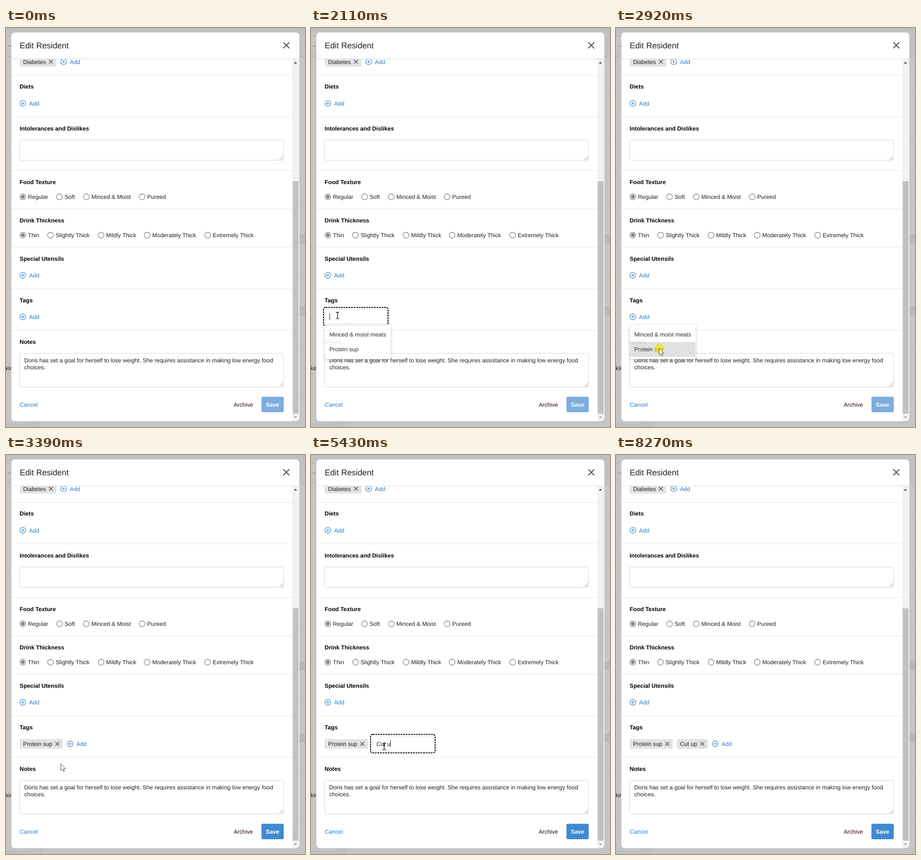
Recreate the animation shown at these times as an HTML page. Size 648 px wide and 864 px high, loop 8.87 s.

```html
<!DOCTYPE html>
<html lang="en">
<head>
<meta charset="utf-8">
<title>Edit Resident</title>
<style>
  html, body { margin: 0; width: 100%; height: 100%; overflow: hidden; background: #c1c1c1; }
  svg { display: block; width: 648px; height: 864px; }
  text { font: 12.52px "Liberation Sans", Arial, sans-serif; fill: #212121; white-space: pre; text-rendering: geometricPrecision; }
  .bold { font-weight: bold; fill: #000; }
  .title { font-size: 17.85px; }
  .link { fill: #2a7acb; }
  .icon { fill: none; stroke: #2a7acb; stroke-width: 1.15; }
  .cross { fill: none; stroke: #4a4a4a; stroke-width: 1.3; }
  .box { fill: #fff; stroke: #d6d6d6; }
  .rule { stroke: #dadada; stroke-dasharray: 2 1; }
  .grip { fill: none; stroke: #777; stroke-width: .8; }
  .radio { fill: #fff; stroke: #767676; stroke-width: 1.2; }
</style>
</head>
<body>
<svg id="stage" viewBox="0 0 648 864"></svg>
<script>
const LOOP = 8870, STEP = 67;
const $ = id => document.getElementById(id);
const rect = (x, y, w, h, fill, more = '') =>
  `<rect x="${x}" y="${y}" width="${w}" height="${h}" fill="${fill}" ${more}/>`;
const text = (x, y, s, cls = '') => `<text x="${x}" y="${y}" class="${cls}">${s}</text>`;
const line = (d, cls, more = '') => `<path d="${d}" class="${cls}" ${more}/>`;
const cross = (x, y, r, more) =>
  line(`M${x - r} ${y - r}L${x + r} ${y + r}M${x + r} ${y - r}L${x - r} ${y + r}`, 'cross', more);
const heading = (y, s) => text(29.6, y + 4.2, s, 'bold');

const add = (x, y) => `<circle cx="${x}" cy="${y}" r="6.3" class="icon"/>` +
  line(`M${x - 3.3} ${y}h6.6M${x} ${y - 3.3}v6.6`, 'icon') + text(x + 13.5, y + 4.6, 'Add', 'link');

const chip = (x, y, w, s) => rect(x, y - 10.5, w, 21, '#e3e3e3', 'rx="1.5"') +
  text(x + 7, y + 4.6, s) + cross(x + w - 11.7, y, 4.3);

const radios = (y, options) => options.map(([x, s], i) =>
  `<circle cx="${x}" cy="${y}" r="6.3" class="radio"/>` +
  (i ? '' : `<circle cx="${x}" cy="${y}" r="4.1" fill="#858585"/>`) +
  text(x + 11, y + 4.5, s)).join('');

const textarea = (y, h) => `<rect x="29.5" y="${y}" width="572" height="${h}" rx="3" class="box"/>` +
  line(`M592.5 ${y + h - 1}l8-8M597 ${y + h - 1}l3.5-3.5`, 'grip');

const field = x => rect(x + .5, 608.5, 133, 33, '#fff', 'rx="2" stroke="#e0e0e0"') +
  rect(x - 3, 605, 140, 40, 'none', 'rx="5" stroke="#000" stroke-width="2" stroke-dasharray="3.7 1.8"');

const popup = (x, options) => rect(x, 643, 142.5, options.length * 32 + 10, '#fff',
  'rx="4" filter="url(#shadow)"') + '<rect id="hover" width="142" height="32" fill="#dfdfdf"/>' +
  options.map((s, i) => text(x + 9.7, 668 + i * 32, s)).join('');

const page = () => {
  const edges = [62, 130, 236, 306, 376, 447, 465, 533, 603, 621, 689, 795];
  return rect(0, 0, 648, 864, '#c1c1c1') +
    rect(-5, 18.5, 30, 34, '#c6c6c6', 'stroke="#b6b6b6"') + text(4, 40, '...') +
    rect(-9.5, 62.5, 65, 795, '#c5c5c5', 'rx="7" stroke="#b4b4b4"') +
    line('M0 251.5H12', '', 'stroke="#b2b2b2"') + text(-1, 740.5, 'kin') +
    rect(74.5, 62.5, 590, 820, '#c5c5c5', 'rx="7" stroke="#b4b4b4"') +
    rect(630, 447, 18, 18, '#b9b9b9') + rect(630, 603, 18, 18, '#b9b9b9') +
    edges.map(y => line(`M630 ${y + .5}H648`, '', 'stroke="#b0b0b0"')).join('');
};

const dialog = () => rect(11.7, 9.8, 624, 841.4, '#fff', 'rx="7"') +
  chip(30, 73, 79, 'Diabetes') + add(125, 73) +
  rect(20, 55, 600, 12, '#fff') + rect(12, 66.5, 623.5, 1, '#dadada') +
  text(29.8, 43.8, 'Edit Resident', 'title') + cross(607.5, 37.5, 6.5, 'style="stroke-width:1.8"') +
  [102, 192, 308, 391, 474, 564, 654].map(y => line(`M12 ${y + .5}H620`, 'rule')).join('') +
  heading(127, 'Diets') + add(36.5, 163) +
  heading(217.5, 'Intolerances and Dislikes') + textarea(242.5, 44) +
  heading(333.5, 'Food Texture') +
  radios(365.6, [[36.5, 'Regular'], [116, 'Soft'], [174, 'Minced &amp; Moist'], [295, 'Pureed']]) +
  heading(417, 'Drink Thickness') +
  radios(448.6, [[36.5, 'Thin'], [96.5, 'Slightly Thick'], [206, 'Mildly Thick'],
    [306, 'Moderately Thick'], [437, 'Extremely Thick']]) +
  heading(499.5, 'Special Utensils') + add(36.5, 535.5) +
  heading(590, 'Tags') + heading(679.5, 'Notes') + textarea(704.5, 73) +
  text(39.5, 724.1, 'Doris has set a goal for herself to lose weight. She requires assistance in making low energy food') +
  text(39.5, 738.6, 'choices.') +
  text(29.8, 820, 'Cancel', 'link') +
  '<text x="493.5" y="820" style="fill:#2b0a12">Archive</text>' +
  rect(553.6, 798.6, 48.3, 33.3, '#7eaddd', 'rx="3" id="save"') +
  '<text x="577.7" y="820" class="bold" text-anchor="middle" style="fill:#fff">Save</text>' +
  line('M620.5 67.5H635.7V844a7 7 0 0 1-7 7H620.5Z', '', 'fill="#f1f1f1"') +
  rect(621.5, 332, 12.5, 503, '#c1c1c1') +
  line('M623.7 77l3.5-4 3.5 4z', '', 'fill="#505050"') +
  line('M623.7 841l3.5 4 3.5-4z', '', 'fill="#a3a3a3"');

$('stage').innerHTML = `<defs><filter id="shadow" x="-20%" y="-20%" width="140%" height="150%">
  <feDropShadow dx="0" dy="1.5" stdDeviation="3" flood-opacity=".25"/></filter></defs>` +
  page() + dialog() + `<g id="tags"></g><text id="typed" x="142" y="630"></text>
  <path id="caret" stroke="#222"/><g id="list"></g>
  <circle id="click" r="10.5" fill="#f0e212" opacity=".75"/><g id="cursor"></g>`;

const between = (t, a, b) => t >= a && t < b;
const ramp = (t, a, b) => Math.min(1, Math.max(0, (t - a) / (b - a)));

const cursors = {
  arrow: '<path d="M0 0V14.4L3.3 11.4L5.8 17L8 16L5.6 10.5H10.3Z" fill="#fff" stroke="#333" stroke-width=".9"/>',
  hand: `<path d="M-1.4 9V1.4a1.4 1.4 0 0 1 2.8 0V6q2.3-.6 2.8.6 2.2-.5 2.6.8 2.2-.3 2.2 1.2V12q0 2-1.5 5H0
    q-1.5-2.6-5.2-6.5-.4-2 1.5-2z" fill="#fff" stroke="#222" stroke-width=".9"/>`,
  beam: `<path d="M-2-5.5q3 0 3.5 1 .5-1 3.5-1M1.5-4.5V7.5M-2 8.5q3 0 3.5-1 .5 1 3.5 1"
    fill="none" stroke="#111" stroke-width="1.4"/>`
};

// Pointer stops: time, x, y
const route = [
  [820, 521, 858], [1290, 125, 674.5], [1370, 84, 644], [1510, 56, 621],
  [2160, 56, 621], [2300, 63, 636], [2550, 88, 681], [2710, 93, 693], [2780, 93.5, 693.5],
  [3130, 93.5, 693.5], [3300, 108, 679], [3550, 149, 640], [3680, 157, 630],
  [7240, 157, 630], [7400, 195, 655], [7700, 385, 775], [7950, 490, 838], [8130, 531, 859], [8200, 539, 861]
];
function pointer(t) {
  t = 820 + Math.floor((t - 820) / STEP) * STEP;
  const i = route.findIndex(stop => stop[0] > t);
  if (i < 1) return route[i ? route.length - 1 : 0].slice(1);
  const [a, b] = [route[i - 1], route[i]], p = ramp(t, a[0], b[0]);
  return [1, 2].map(k => a[k] + (b[k] - a[k]) * p);
}

const keys = [4770, 4960, 5060, 5160, 5430, 5630];
const chips = chip(30, 625.5, 93, 'Protein sup');
const shown = {};
function fill(id, html) {
  if (shown[id] !== html) $(id).innerHTML = shown[id] = html;
}

function render(t) {
  const first = between(t, 1850, 2920), second = between(t, 3950, 6350);
  fill('tags',
    first ? field(30) :
    t < 2990 ? add(36.5, 625.5) :
    t < 3950 ? chips + add(139, 625.5) :
    second ? chips + field(132) :
    chips + chip(132, 625.5, 67, 'Cut up') + add(215, 625.5));
  $('save').setAttribute('fill', t < 2990 ? '#7eaddd' : '#3f8ad1');

  const count = second ? keys.filter(k => k <= t).length : 0;
  $('typed').textContent = 'Cut up'.slice(0, count);
  const start = first ? 1850 : count ? keys[count - 1] : 3950;
  const blink = (first || second) && (t - start) % 1060 < 530;
  const x = first ? 40.5 : 142.5 + (count ? $('typed').getComputedTextLength() : 0);
  $('caret').setAttribute('d', blink ? `M${x} 618V632` : '');

  const [px, py] = pointer(t), early = t < 3500, meats = 'Minced &amp; moist meats';
  fill('list', early ? popup(30, [meats, 'Protein sup']) : popup(132, [meats]));
  $('list').setAttribute('opacity',
    early ? ramp(t, 1850, 2130) * (1 - ramp(t, 2905, 3130)) :
    t < 4960 ? ramp(t, 3920, 4190) :
    t < 6350 ? 0 : .6 * (1 - ramp(t, 6330, 6540)));
  const hover = $('hover');
  hover.setAttribute('x', 30.2);
  hover.setAttribute('y', py < 680 ? 648 : 680);
  hover.setAttribute('opacity', early && t > 2160 && py > 648 ? 1 : 0);

  const kind = between(t, 1480, 1850) || between(t, 3620, 3950) ? 'hand' :
    first && py < 643 || between(t, 3950, 7290) ? 'beam' : 'arrow';
  fill('cursor', between(t, 820, 8270) ? cursors[kind] : '');
  $('cursor').setAttribute('transform', `translate(${px} ${py})`);
  const pressed = [1710, 2920, 3810].some(c => between(t, c, c + 140));
  $('click').setAttribute('transform', `translate(${px} ${py + .8})`);
  $('click').setAttribute('visibility', pressed ? 'visible' : 'hidden');
}

const began = performance.now();
(function frame() {
  render((performance.now() - began) % LOOP);
  requestAnimationFrame(frame);
})();
</script>
</body>
</html>
```
